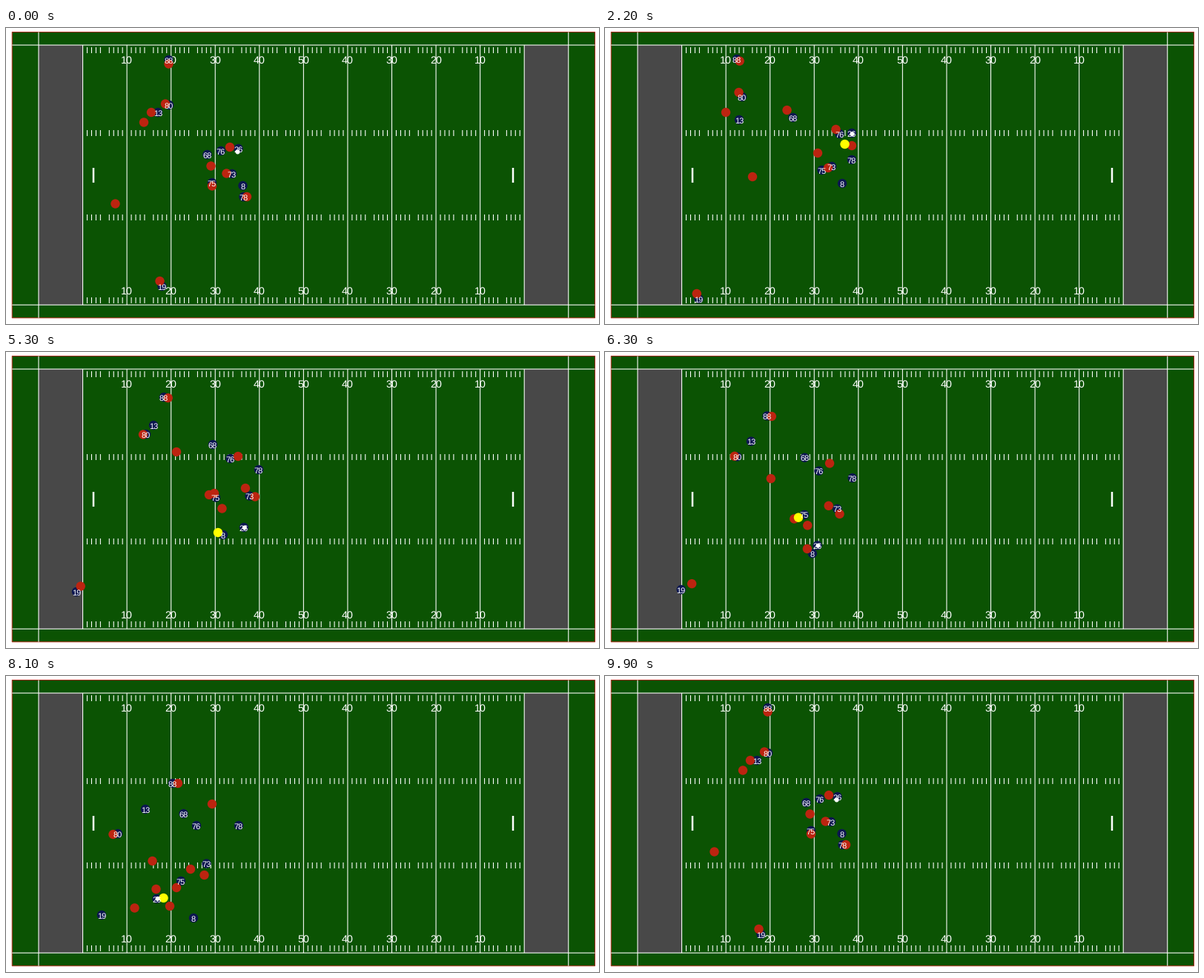
Write a matplotlib script that moves like this. It is 800 px wide and 400 px high and loops after 10 s.

```python
import numpy as np
import matplotlib.pyplot as plt
from matplotlib.animation import FuncAnimation
from matplotlib.patches import Circle, Rectangle

W, H, DPI = 800, 400, 100
PX = 72 / DPI
FRAMES, STEP = 100, 100
GREEN, GRAY = "#0b5303", "#484848"
NAVY, RED, YELLOW = "#0c1650", "#bc2410", "#ffff00"

# The panel leaves a margin of 1/22 of its size on each side of the field
LEFT, TOP, WIDTH, HEIGHT = 8.25, 5.5, 786.25, 386.25
YARD = WIDTH / 1.1 / 120
GOAL = LEFT + WIDTH / 22 + 10 * YARD
SIDES = [TOP + HEIGHT / 22, TOP + HEIGHT * 21 / 22]

plt.rcParams.update({"font.family": "Liberation Sans", "text.hinting": "none"})
fig = plt.figure(figsize=(W / DPI, H / DPI), dpi=DPI, facecolor="white")
ax = fig.add_axes([0, 0, 1, 1])
ax.set_xlim(0, W)
ax.set_ylim(H, 0)
ax.axis("off")


def box(x, y, w, h, fill, edge="none", z=0):
    ax.add_patch(Rectangle((x, y), w, h, fc=fill, ec=edge, lw=PX, zorder=z,
                           snap=False))


def vlines(x, y0, y1, width=1.07):
    ax.vlines(x, y0, y1, color="white", lw=width * PX, zorder=2, snap=False)


def label(x, y, text, size, z):
    return ax.text(x, y, text, color="white", fontsize=size * PX,
                   ha="center", va="baseline", zorder=z)


def draw_field():
    box(LEFT, TOP, WIDTH, HEIGHT, GREEN, "#a52a12")
    for yard in (-10, 100):
        box(GOAL + yard * YARD, SIDES[0], 10 * YARD, SIDES[1] - SIDES[0],
            GRAY, z=1)
    ax.hlines(SIDES, LEFT, LEFT + WIDTH, color="white", lw=1.07 * PX,
              zorder=2, snap=False)
    vlines(GOAL + YARD * np.array([-10, 110]), TOP, TOP + HEIGHT)
    vlines(GOAL + YARD * np.arange(0, 101, 10), *SIDES)
    ticks = [GOAL + YARD * n for n in range(1, 100) if n % 5]
    for y in (26, 138, 252, 364):
        vlines(ticks, y, y + 8)
    vlines([118, 684], 189, 209, width=2.5)
    for n in range(10, 100, 10):
        for y in (48, 360):
            label(GOAL + n * YARD, y, str(min(n, 100 - n)), 14.2, 3)


# Seconds at which every route passes its four points
KNOTS = np.array([0, 2.2, 5.3, 8.1])
SURGE = 13


def route(points, surge):
    """Smooth run through the points, coasting to a stop after the last."""
    pts = np.array(points, float)
    slopes = np.gradient(pts, KNOTS, axis=0)

    def at(t):
        if t > KNOTS[-1]:
            return pts[-1] + slopes[-1] * (1 - np.exp(KNOTS[-1] - t))
        i = max(np.searchsorted(KNOTS, t) - 1, 0)
        h = KNOTS[i + 1] - KNOTS[i]
        u = (t - KNOTS[i]) / h
        blend = u * u * (3 - 2 * u)
        pos = (pts[i] + blend * (pts[i + 1] - pts[i])
               + h * u * (1 - u) * ((1 - u) * slopes[i] - u * slopes[i + 1]))
        # Mid-play the pack swings together towards the near sideline
        if i == 1 and surge:
            pos[1] -= SURGE * np.sin(np.pi * u) ** 2
        return pos

    return at


def shadow(lead, start, end, power):
    """Follow another path, the gap changing from start to end."""
    start, end = np.array(start), np.array(end)

    def at(t):
        u = min(t / KNOTS[-1], 1) ** power
        return lead(t) + start + (end - start) * u

    return at


class Mover:
    def __init__(self, path, color, radius, z, number=None):
        self.path = path
        self.dot = ax.add_patch(Circle((0, 0), radius, fc=color, lw=0, zorder=z))
        self.text = label(0, 0, number, 11, 7) if number else None

    def move(self, t):
        x, y = self.path(t)
        self.dot.center = x, y
        if self.text:
            self.text.set_position((x, y + 4.4))


movers = []


def add(path, *look):
    movers.append(Mover(path, *look))
    return movers[-1]


def offense(number, *points, surge=True):
    path = route(points, surge)
    add(path, NAVY, 6.2, 4, number)
    return path


def defense(*points):
    return add(route(points, True), RED, 6.2, 5)


draw_field()

# Receivers and the ball carrier keep clear of the pack
end_near = offense("88", (219.5, 43), (178, 42), (213, 61), (225, 145),
                   surge=False)
end_far = offense("19", (210.5, 349), (126.5, 366), (95, 324), (129, 323),
                  surge=False)
offense("13", (205, 114), (181, 124), (199, 99), (188, 180), surge=False)
carrier = offense("26", (313.5, 163), (333, 142), (321, 237), (203.5, 301),
                  surge=False)
offense("80", (220, 104), (185, 93), (189, 111), (151, 213))
offense("68", (271.5, 171), (253.5, 121), (279, 125), (239.5, 186))
offense("76", (290, 166), (316.5, 143), (302.5, 144), (257, 202))
offense("73", (305, 197), (306, 187), (328.5, 194.5), (270.5, 253.5))
offense("75", (278, 209), (292.5, 192), (283, 196.5), (236, 277))
offense("8", (319.5, 213), (320, 210), (293, 247), (253, 327))
offense("78", (320.5, 228), (333, 178), (341, 159), (314, 202))

add(shadow(end_near, (0, 5.5), (7, 0), 0.5), RED, 6.2, 5)
add(shadow(end_far, (-3, -7), (44.5, -9.5), 4), RED, 6.2, 5)
defense((215, 102.5), (180.5, 87), (230, 135), (197.5, 250))
defense((196, 114), (163, 114), (185, 111.5), (144.5, 214))
defense((302, 161), (311.5, 137), (313, 141), (278, 173))
defense((297.5, 196.5), (301, 189), (291.5, 211.5), (230, 286))
defense((325, 228), (333, 159), (336, 195.5), (267.5, 269))
safety = defense((186, 127.5), (245.5, 111), (274, 193), (202.5, 288))
rusher = defense((276.5, 186.5), (323.5, 157), (323, 184), (249, 261))
tackler = defense((278, 213.5), (287, 169), (281, 191), (212.5, 300))
backer = defense((147.5, 237.5), (199, 201), (286, 244), (221, 311))

add(shadow(carrier, (-1, 4.5), (1, 0), 0.25), "white", 3, 8)

# Who is lit, and from which second
LIT = ((0.8, rusher), (2.9, safety), (4.4, backer), (5.8, tackler))


def draw(frame):
    # The play holds for one frame twice and snaps back on the last
    held = {19: 18, 74: 73, FRAMES - 1: 0}.get(frame, frame)
    t = held * STEP / 1000
    for mover in movers:
        mover.move(t)
    lit = [player for since, player in LIT if t >= since][-1:]
    for _, player in LIT:
        on = player in lit
        player.dot.set(facecolor=YELLOW if on else RED, zorder=6 if on else 5)
    return []


anim = FuncAnimation(fig, draw, frames=FRAMES, interval=STEP,
                     repeat=True, repeat_delay=0, blit=False)
plt.show()
```
